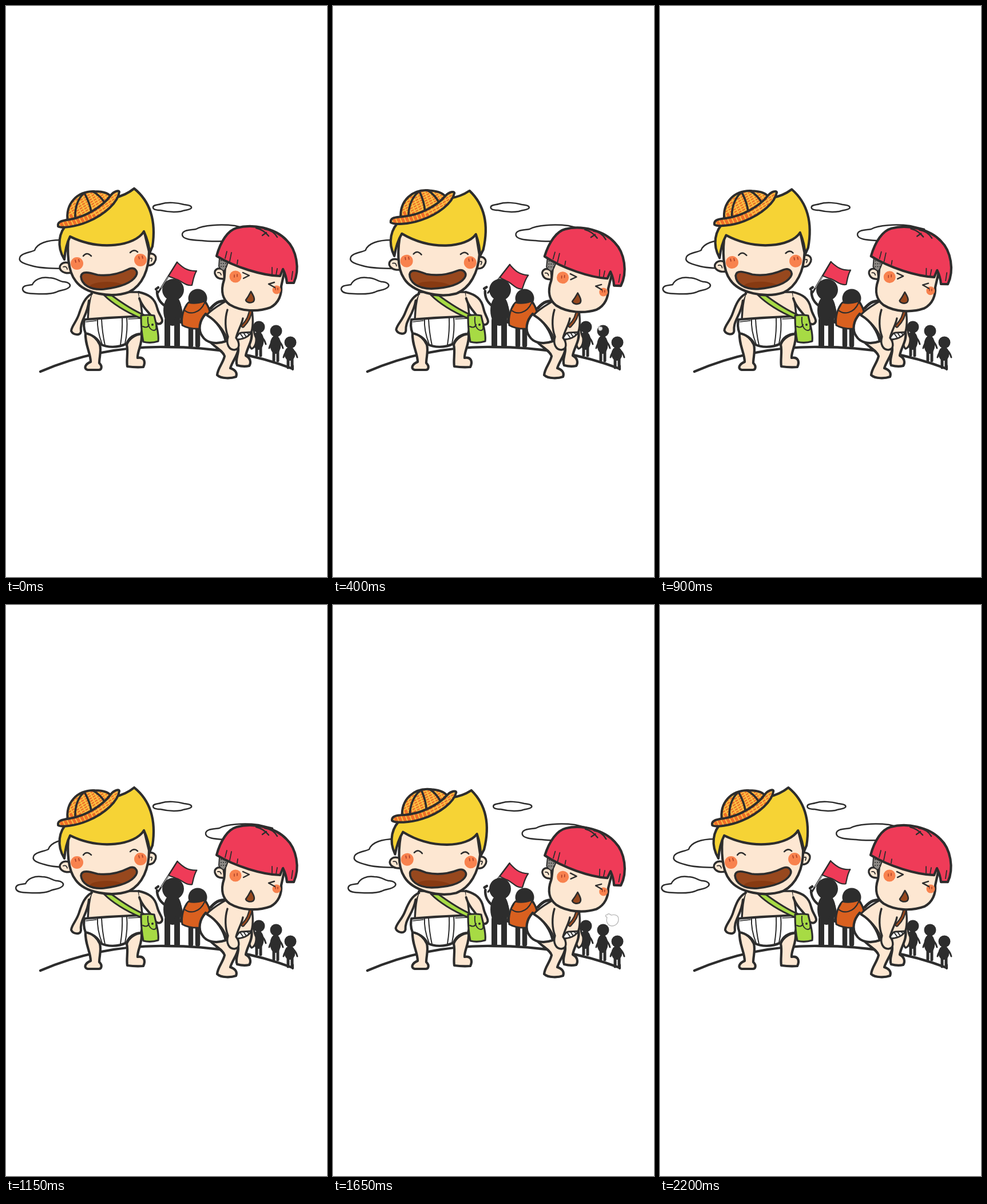
Recreate the animation shown at these times as an HTML page with a canvas. Size 561 px wide and 998 px high, loop 2250 ms.

```html
<!DOCTYPE html>
<html lang="en">
<head>
<meta charset="utf-8">
<title>Out for a walk</title>
<style>
html, body { margin: 0; width: 100%; height: 100%; overflow: hidden; background: #fff; }
canvas { display: block; width: 100vw; height: 100vh; }
</style>
</head>
<body>
<canvas id="stage" width="561" height="998"></canvas>
<script>
const ctx = document.getElementById('stage').getContext('2d');
const LOOP = 2250, STEP = 50, TAU = Math.PI * 2;
const INK = '#2d2d2d', SKIN = '#fde7d2', YELLOW = '#f6d335', RED = '#ef3b58',
      CHEEK = '#f8824e', MOUTH = '#97481e', TONGUE = '#873a12', GREEN = '#a7db44',
      PACK = '#d9601f', WHITE = '#fff';

ctx.lineCap = ctx.lineJoin = 'round';

// Fill and outline one path; a null fill or zero width skips that part.
function shape(d, fill, width = 4.2, color = INK) {
  const p = new Path2D(d);
  if (fill) { ctx.fillStyle = fill; ctx.fill(p); }
  if (width) { ctx.lineWidth = width; ctx.strokeStyle = color; ctx.stroke(p); }
}
const line = (d, width, color) => shape(d, null, width, color);

// Fill a closed outline but ink only its open side.
function limb(d, width) {
  shape(d, SKIN, 0);
  line(d, width);
}

function oval(x, y, rx, ry = rx, fill = INK) {
  ctx.beginPath();
  ctx.ellipse(x, y, rx, ry, 0, 0, TAU);
  ctx.fillStyle = fill;
  ctx.fill();
}

function turned(x, y, angle, dx, dy, draw) {
  ctx.save();
  ctx.translate(x + dx, y + dy);
  ctx.rotate(angle);
  ctx.translate(-x, -y);
  draw();
  ctx.restore();
}

const swing = (t, period) => (1 - Math.cos(TAU * t / period)) / 2;

function cloud(dx, d) {
  ctx.save();
  ctx.translate(dx, 0);
  shape(d, WHITE, 2.5);
  ctx.restore();
}

function clouds(t) {
  const slow = swing(t, LOOP);
  cloud(24 * slow, 'M24 440C26 432 42 431 50 427C54 415 72 409 95 409L150 410V459C110 459 62 460 45 454C30 450 22 447 24 440Z');
  cloud(-26.5 * swing(t, 1500), 'M29 495C29 488 39 488 46 487C50 478 62 473 75 475C88 475 94 482 101 482C110 483 114 487 111 491C106 497 96 496 88 500C75 505 60 503 52 503C40 503 30 502 29 495Z');
  cloud(21.5 * swing(t, LOOP / 2) + 2 * swing(t, LOOP / 2) ** 2, 'M257 352C257 347 265 348 271 346C283 342 300 344 311 347C319 348 325 349 324 353C322 357 312 356 306 359C292 361 278 359 270 357C263 357 257 356 257 352Z');
  cloud(41 * slow, 'M308 399C309 391 322 392 332 390C344 383 375 381 400 384L425 390V411C390 410 360 413 342 410C326 409 307 408 308 399Z');
}

function walker(x, y, half, feet) {
  const mid = y + 8 + half;
  oval(x, y, 10.5);
  oval(x - 1, mid, 9.5, half);
  line(`M${x - 5} ${mid - 7}Q${x - 10} ${mid - 2} ${x - 12} ${mid + 6}M${x + 4} ${mid - 7}Q${x + 10} ${mid - 2} ${x + 12} ${mid + 6}`, 3);
  line(`M${x - 4} ${mid + 4}V${feet - 3}M${x + 3} ${mid + 4}V${feet - 2}`, 5);
}

function flag(k, side) {
  turned(262, 500, 0.08 * k + 0.05 * side, 5 * k + side, 0, () => {
    line('M266 501L299 448', 3);
    line('M271 493L285 471', 1, '#ddd');
    shape('M299 448C307 455 315 464 333 463C328 471 327 480 325 488C313 490 306 479 296 477C291 475 288 474 284 472Z', RED, 2.2);
  });
}

function crowd(k, side) {
  flag(k, side);
  turned(277, 524, 0.09 * k, 0, 0, () => line('M278 524C270 519 264 510 264 499M262 495L266 492', 4.5));
  oval(292, 496, 19);
  oval(291, 532, 16, 27);
  line('M302 520Q309 533 306 553', 4.5);
  line('M282 549V593M299 549V593', 10);

  line('M323 560V593M335 560V593', 8.5);
  oval(335, 511, 16.5);
  line('M349 520L355 532', 6);
  shape('M319 518C310 527 306 545 308 558C318 564 330 565 343 564L356 534C354 526 351 520 346 516Q331 521 319 518Z', PACK, 3);
  line('M311 531C321 541 339 537 347 519M316 523L310 533', 2.2);

  walker(442, 561, 16, 613);
  walker(472, 568, 16, 622);
  walker(497, 588, 12, 635);
}

function puff(x, y, size, alpha) {
  ctx.save();
  ctx.translate(x, y);
  ctx.scale(size, size);
  ctx.globalAlpha = alpha;
  shape('M-16 -8C-23 -11 -21 -18 -15 -16C-13 -22 -5 -18 -3 -15C7 -18 20 -16 20 -3C21 10 11 19 -1 19C-13 18 -20 7 -16 -8Z', WHITE, 1.4 / size, '#bbb');
  ctx.restore();
}

function puffs(t) {
  const a = (t - 350) / 500, b = (t - 1400) / 600;
  if (a > 0 && a < 1) puff(465 + 20 * a, 561 + 28 * a, 0.14 + 0.35 * a, 1 - a);
  if (b > 0 && b < 1) {
    const e = Math.min(1, b / 0.75);
    puff(470 + 32 * e, 536 + 26 * e, Math.max(0.1, e), Math.min(1, 2.6 * (1 - b)));
  }
}

function redBody() {
  // far arm and leg
  shape('M427 549C433 560 432 570 437 580C438 590 434 598 429 599C423 594 424 578 420 568Z', SKIN, 3.4);
  shape('M405 580C415 578 424 574 429 570C432 584 421 598 419 611C427 615 429 623 425 629Q415 631 404 628C400 620 406 610 406 600Z', SKIN);
  // torso and pants
  shape('M390 512C375 522 360 529 351 540L380 584L402 583C414 580 425 575 429 569C433 555 431 540 429 524Z', SKIN, 3.4);
  line('M358 528C368 517 376 514 388 516', 5);
  line('M428 529C427 543 421 552 414 559', 7);
  line('M428 529C427 543 421 552 414 559', 3, MOUTH);
  shape('M401 583C404 576 408 571 411 571L429 570C424 578 414 583 401 583Z', WHITE, 3);
  line('M409 572L414 579M415 571L419 577M421 570L424 574', 2);
  shape('M356 586C364 596 379 602 382 612C379 625 370 633 369 645C376 652 394 651 402 648C405 640 399 635 392 633C396 620 404 612 406 600C400 589 392 582 382 580Z', SKIN);
  shape('M349 538C338 550 335 566 343 577C350 589 367 592 384 586C380 568 369 551 352 541Z', WHITE);
  line('M354 542C367 550 380 564 386 580', 2.6);
  // near arm
  limb('M387 531C382 547 383 565 388 578C384 591 390 601 399 601C409 600 409 589 402 580C405 567 412 557 414 546', 3.4);
}

function redHead() {
  shape('M380 461C369 455 362 463 366 470C369 477 376 477 382 477Z', SKIN, 3.4);
  line('M370 466Q375 465 376 470', 1.8);
  shape('M386 440C381 458 383 470 381 479C374 500 380 514 391 522C411 534 440 535 462 527C477 519 482 504 481 490L487 462Z', SKIN);
  shape('M373 440L389 444C387 452 385 459 381 463Q374 460 372 455Z', '#8d8a86', 2);
  for (let i = 0; i < 9; i++) oval(376 + i % 3 * 4, 445 + (i / 3 | 0) * 5, 1);
  oval(401, 473, 10.5, 10.5, CHEEK);
  oval(473, 496, 7.5, 7.5, CHEEK);
  line('M399 470V474M404 469V473M471 493V496M475 493V496', 1.5, '#a93c25');
  line('M414 466L425 471L415 476M469 483L459 486L470 492', 2.4);
  shape('M428 499C433 507 436 513 432 517C427 520 420 518 419 514C422 510 425 505 428 499Z', MOUTH, 2.6);
  shape('M368 437C375 411 388 392 403 388C431 380 470 388 490 409C508 426 514 460 503 484L491 484C490 474 487 466 484 460L479 472C448 471 401 457 368 437Z', RED);
  line('M437 388Q450 391 459 402M452 390Q467 392 474 404M448 401L455 396', 2.4);
  line('M386 429L383 441M394 431L391 446M405 444L404 451M465 457L465 469M474 459L472 470M501 464L499 478', 1.8);
}

function redBoy(k) {
  redBody();
  turned(380, 490, 0.04 * k, 0, 1.3 * k, redHead);
}

function blondBody(k) {
  shape('M139 569C150 574 160 582 164 592C167 603 163 614 163 624C169 630 167 636 162 636H143C135 634 138 626 148 622C148 607 137 590 139 569Z', SKIN);
  shape('M211 592C214 582 226 574 237 573C239 590 229 604 230 615C240 613 245 620 240 631Q226 632 212 630C210 618 214 605 211 592Z', SKIN);
  shape('M150 500C145 515 144 530 143 549H239C237 530 236 517 232 500Z', SKIN, 3.4);
  shape('M137 548Q187 544 239 542C241 553 239 564 236 573C224 573 215 580 211 590C195 598 176 597 165 591C160 581 150 574 139 572C135 562 136 555 137 548Z', WHITE);
  line('M160 547C159 562 163 578 168 591M167 547Q168 570 173 593M203 544Q204 568 200 592M211 544Q213 567 208 590', 2);
  line('M140 552L158 550M214 547L236 546', 1.5);
  turned(148, 508, 0.075 * k, 0, 0, () =>
    limb('M150 503C138 509 133 522 128 537C124 551 114 560 114 568C117 575 130 577 131 569C130 560 132 554 136 545C142 532 144 525 145 515', 4));
  turned(236, 503, 0.055 * k, 0, 0, () =>
    limb('M232 500C250 504 260 511 264 527C267 540 274 545 273 551C271 557 264 557 260 552C257 544 250 537 244 530C239 524 235 517 233 511', 4));
  shape('M171 505L185 506C200 517 220 531 241 540L236 546C213 536 188 522 171 505Z', GREEN, 3);
  shape('M236 541Q248 539 259 541C262 556 268 572 266 586Q253 590 240 587C237 573 236 557 236 541Z', GREEN, 3.2);
  line('M239 560Q247 564 250 557M248 544C247 555 250 566 258 567Q264 567 262 559', 2);
  oval(256, 557, 2);
}

// Woven straw: diagonal strands clipped to the given outline.
function straw(d) {
  ctx.save();
  ctx.clip(new Path2D(d));
  ctx.fillStyle = '#ef6f28';
  ctx.fillRect(85, 315, 120, 80);
  for (let x = -80; x < 200; x += 8) {
    line(`M${x + 60} 315L${x + 100} 395M${x + 85} 365L${x + 165} 315`, 1.8, '#fac545');
  }
  ctx.restore();
  line(d, 4);
}

function blondHead() {
  shape('M112 450C98 444 89 456 97 463C103 468 109 467 115 466Z', SKIN, 3.4);
  shape('M246 435C257 429 266 437 260 447C257 454 250 454 244 453Z', SKIN, 3.4);
  line('M100 456Q106 454 107 460M252 441Q257 439 254 446', 1.8);
  shape('M110 398C106 430 108 464 122 481C138 503 184 511 215 500C239 488 250 460 250 429L240 388Z', SKIN);
  shape('M102 443C88 420 92 395 108 380L190 335Q209 331 224 319C250 340 263 373 256 420L251 432C250 416 246 405 241 394C226 419 165 429 112 403C106 415 103 430 102 443Z', YELLOW);
  straw('M108 377C103 346 124 323 155 324C171 324 181 328 184 335L150 364Z');
  line('M136 327C124 339 120 355 121 372M137 327C143 338 148 350 149 361M151 324C161 329 169 338 173 345', 3.6);
  straw('M91 385C89 376 100 375 112 373C141 368 169 350 183 331C189 323 197 322 198 325C196 342 174 364 143 377C122 386 97 389 91 385Z');
  for (const [x, y] of [[124, 450], [235, 444]]) {
    oval(x, y, 11, 11, CHEEK);
    line(`M${x - 3} ${y - 6}L${x - 2} ${y - 2}M${x + 3} ${y - 7}L${x + 4} ${y - 3}`, 1.6, '#a93c25');
  }
  line('M135 437Q141 429 149 437M217 431Q224 424 230 430', 2.5);
  const mouth = 'M131 473C132 462 146 466 160 470C185 473 204 465 214 460C225 455 232 464 227 472C219 485 195 492 171 495C146 497 132 486 131 473Z';
  shape(mouth, MOUTH, 0);
  ctx.save();
  ctx.clip(new Path2D(mouth));
  oval(177, 491, 31, 9, TONGUE);
  ctx.restore();
  line(mouth, 3.6);
}

function blondBoy(k) {
  blondBody(k);
  turned(182, 507, 0.097 * k, 0, 0, blondHead);
}

function draw(t) {
  const k = swing(t, LOOP / 2);
  const side = Math.sin(TAU * t / (LOOP / 2));
  ctx.fillStyle = WHITE;
  ctx.fillRect(0, 0, 561, 998);
  clouds(t);
  line('M60 639Q165 594 280 596Q402 596 501 634', 4.4);
  line('M501 629V635', 4);
  crowd(k, side);
  puffs(t);
  redBoy(k);
  blondBoy(k);
}

const start = performance.now();
function tick(now) {
  const t = Math.max(0, now - start) % LOOP;
  draw(Math.floor(t / STEP) * STEP);
  requestAnimationFrame(tick);
}
draw(0);
requestAnimationFrame(tick);
</script>
</body>
</html>
```
